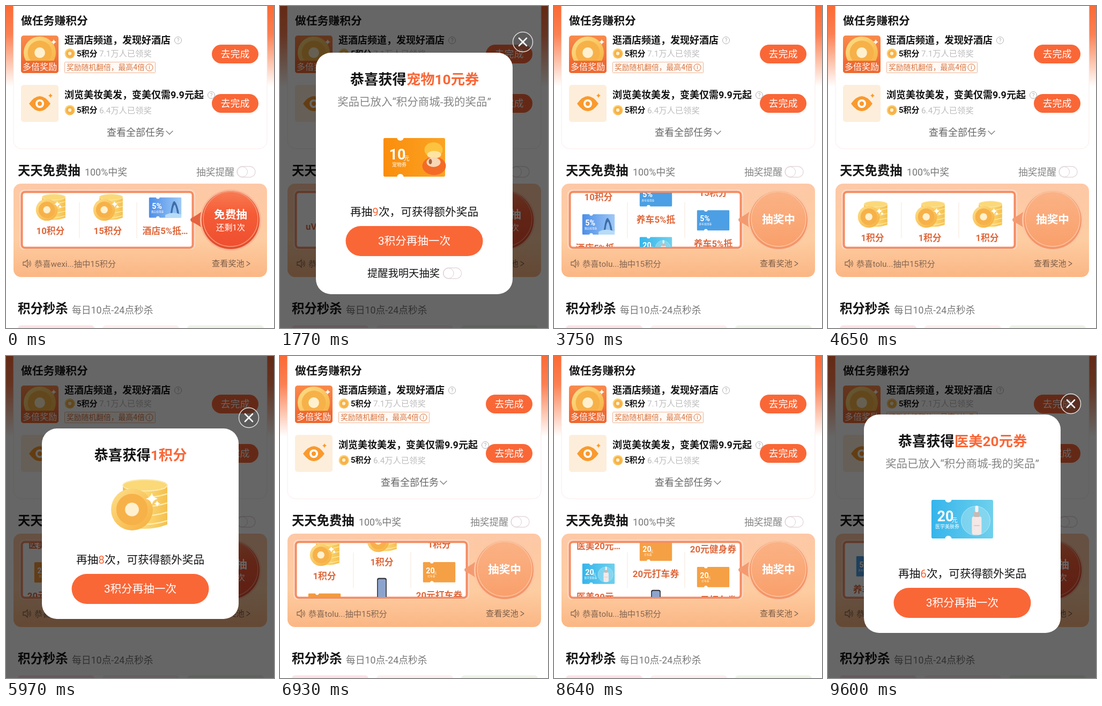
An HTML page that plays this animation: 500 px wide and 600 px high, repeating every 9630 ms.

```html
<!DOCTYPE html>
<html lang="zh-CN">
<head>
<meta charset="utf-8">
<title>天天免费抽</title>
<style>
html, body { margin: 0; width: 100%; height: 100%; overflow: hidden; background: #fff; }
svg { display: block; width: 500px; height: 600px; }
text { font-family: Roboto, "Noto Sans CJK SC", "Noto Sans CJK", sans-serif; white-space: pre; }
</style>
</head>
<body>
<svg id="stage" viewBox="0 0 500 600" xmlns="http://www.w3.org/2000/svg"></svg>
<script>
const LOOP = 9630, PITCH = 95, ORANGE = '#fa6737', INK = '#141414';
const COLUMNS = [83, 190, 297];

// --- drawing helpers ---
const text = (x, cy, size, str, fill = INK, weight = 400, anchor = 'start') =>
  `<text x="${x}" y="${cy + size * .36}" font-size="${size}" fill="${fill}" font-weight="${weight}" text-anchor="${anchor}">${str}</text>`;
const mid = (x, cy, size, str, fill, weight) => text(x, cy, size, str, fill, weight, 'middle');
const rect = (x, y, w, h, r, fill, extra = '') =>
  `<rect x="${x}" y="${y}" width="${w}" height="${h}" rx="${r}" fill="${fill}" ${extra}/>`;
const circle = (x, y, r, fill, extra = '') => `<circle cx="${x}" cy="${y}" r="${r}" fill="${fill}" ${extra}/>`;
const path = (d, fill, extra = '') => `<path d="${d}" fill="${fill}" ${extra}/>`;
const line = (d, color, w) => path(d, 'none', `stroke="${color}" stroke-width="${w}" stroke-linecap="round" stroke-linejoin="round"`);
const group = (x, y, scale, body) => `<g transform="translate(${x} ${y}) scale(${scale})">${body}</g>`;
const linear = (id, x2, y2, ...stops) => `<linearGradient id="${id}" x2="${x2}" y2="${y2}">` +
  stops.map(([o, c]) => `<stop offset="${o}" stop-color="${c}"/>`).join('') + '</linearGradient>';
const sparkle = (x, y, r, fill = '#fff') =>
  path(`M${x} ${y - r}Q${x + r * .2} ${y - r * .2} ${x + r} ${y}Q${x + r * .2} ${y + r * .2} ${x} ${y + r}Q${x - r * .2} ${y + r * .2} ${x - r} ${y}Q${x - r * .2} ${y - r * .2} ${x} ${y - r}Z`, fill);
const toggle = (x, y) => rect(x, y, 34, 20, 10, '#fff', 'stroke="#e6d9dc" stroke-width="1.3"') +
  circle(x + 10, y + 10, 9.5, '#fff', 'stroke="#dcd0d4"');
const hint = (x, y, mark, color) => circle(x, y, 6.5, 'none', `stroke="${color}"`) + mid(x, y, 10, mark, color);

const coin = (x, y, r) => circle(x, y, r, 'url(#gold)') + circle(x, y, r * .75, '#f7b149') + circle(x, y, r * .33, '#fff1cf');

// Art is centred on the origin.
const coinStack = () => group(-52, -48, 1,
  path('M22 11V84Q63 100 105 84V11Z', 'url(#stack)') +
  [27, 44, 61, 77].map(y => line(`M24 ${y}Q63 ${y + 13} 104 ${y}`, '#fff0b5', 2)).join('') +
  '<ellipse cx="63.5" cy="11" rx="41.5" ry="10.5" fill="#fbd978" stroke="#fce9ae" stroke-width="2"/>' +
  coin(39, 56, 39) + sparkle(76, 36, 11) + sparkle(86, 45, 6));

const ticketShape = 'M-55 -36H-32A6 5 0 0 0 -20 -36H55Q57.5 -36 57.5 -33V33Q57.5 36 55 36H-20A6 5 0 0 0 -32 36H-55Q-57.5 36 -57.5 33V-33Q-57.5 -36 -55 -36Z';
const ticket = (fill, amount, unit, name, art) => path(ticketShape, fill) +
  text(-47, -6, 27, amount, '#fff', 700) + text(-20, 2, 11, unit, '#fff') +
  mid(-28, 14, 9, name, '#fff', 500) + art;
const petArt = '<ellipse cx="37" cy="16" rx="22" ry="17" fill="#f46b26"/>' +
  '<ellipse cx="36" cy="-14" rx="17" ry="14" fill="#fbc33f"/><ellipse cx="37" cy="-5" rx="13" ry="7" fill="#ffe3a1"/>' +
  '<ellipse cx="36" cy="9" rx="13" ry="9" fill="#f7d7b6"/><ellipse cx="30" cy="8" rx="3" ry="5" fill="#a4653f"/>';
const bottleArt = circle(25, 3, 27, '#94dcf2', 'opacity=".65" stroke="#d8f6ff"') +
  rect(18, -5, 18, 34, 4, '#f5e8e6') + rect(22, -14, 10, 10, 1, '#c9b9b5') + rect(24, -25, 6, 12, 2, '#f3f3f3') +
  line('M22 12H32', '#c9a9a0', 1);
const roadArt = path('M18 26Q25 -28 34 -22Q45 -10 50 26H43Q38 -8 33 -10Q26 0 25 26Z', '#3d6ea8') + path('M0 26Q28 12 57 25V36H0Z', '#b7dcf8');

const art = {
  coins: coinStack(),
  pet: ticket('url(#petBg)', '10', '元', '宠物券', petArt),
  skin: ticket('url(#skinBg)', '20', '元', '医学美肤券', bottleArt),
  ride: ticket('#f5a044', '20', '元', '打车券', ''),
  gym: ticket('#f39a3c', '20', '元', '健身券', ''),
  car: ticket('#4c9fe4', '5%', '', '养车抵用券', ''),
  hotel: ticket('url(#hotelBg)', '5%', '', '酒店抵用券', roadArt),
  phone: rect(-17, -42, 34, 84, 7, '#30323a') + rect(-14, -38, 28, 76, 5, '#8ca4cd')
};

const item = (kind, label) => ({ kind, label });
const strip = [
  item('coins', '10积分'), item('phone', 'uVelmo…'), item('ride', '20元打车券'), item('gym', '20元健身券'),
  item('skin', '医美20元…'), item('car', '养车5%抵'), item('coins', '15积分'), item('hotel', '酒店5%抵…')
];
const stripShift = [0, 6, 7];

const draws = [
  { start: 300, stop: 1200, show: 1530, hide: 3240, left: 9, kind: 'pet', won: '宠物10元券', label: '宠物10元…', top: 87, height: 450, remind: true },
  { start: 3270, stop: 4350, show: 5010, hide: 6240, left: 8, kind: 'coins', won: '1积分', label: '1积分', top: 135, height: 355 },
  { start: 6270, stop: 7140, show: 7500, hide: 8040, left: 7, kind: 'coins', won: '1积分', label: '1积分', top: 135, height: 355 },
  { start: 8070, stop: 8970, show: 9300, hide: 9900, left: 6, kind: 'skin', won: '医美20元券', label: '医美20元…', top: 109, height: 407 }
];

// --- static page ---
const taskTitle = (y, title, hintX) => text(109, y, 18, title, INK, 700) + hint(hintX, y, '?', '#b0b0b0');
const reward = (y, count) => coin(119, y, 9.5) + text(132, y, 15, '5积分', INK, 700) + text(174, y, 15.3, count, '#bcbcbc');
const goButton = y => rect(384, y, 87, 35, 17.5, ORANGE) + mid(427.5, y + 17.5, 18, '去完成', '#fff');

const defs = `<defs>
  ${linear('sky', 0, 1, [0, '#fb6a35'], [.35, '#fb8052'], [.7, '#fdc4ad'], [1, '#fff'])}
  ${linear('gold', 1, 1, [0, '#fde08a'], [1, '#f6ae3c'])}
  ${linear('stack', 1, 0, [0, '#f6bd4e'], [.5, '#fbd877'], [1, '#f5c04f'])}
  ${linear('badge', 0, 1, [0, '#f98a4c'], [1, '#f2602c'])}
  ${linear('panel', 0, 1, [0, '#fdc8a6'], [.6, '#fdcda2'], [1, '#fbb684'])}
  ${linear('red', 0, 1, [0, '#f87a52'], [.4, '#f55c36'], [1, '#ef4f30'])}
  ${linear('pale', 0, 1, [0, '#fbb285'], [1, '#f9a06c'])}
  ${linear('petBg', 1, 0, [0, '#fb8d0c'], [1, '#fba324'])}
  ${linear('skinBg', 1, 0, [0, '#35b5ec'], [1, '#6fd0ec'])}
  ${linear('hotelBg', 1, 0, [0, '#4d8ee8'], [1, '#9fc9f6'])}
  <clipPath id="window"><rect x="32" y="348" width="314" height="101" rx="4"/></clipPath>
  <clipPath id="tickerBox"><rect x="50" y="468" width="220" height="24"/></clipPath>
  <clipPath id="badgeBox"><rect x="28" y="55" width="70" height="70" rx="5"/></clipPath>
</defs>`;

const tasks = rect(0, 0, 500, 150, 0, 'url(#sky)') +
  rect(14, -20, 473, 286, 15, '#fff', 'stroke="#fcebea"') +
  text(28, 27.5, 20.8, '做任务赚积分', INK, 700) +
  `<g clip-path="url(#badgeBox)">${rect(28, 55, 70, 70, 0, 'url(#badge)')}${coin(63, 87, 30)}${rect(28, 102, 70, 23, 0, '#ef6a32')}</g>` +
  sparkle(89, 67, 5) + mid(63, 113, 16, '多倍奖励', '#fff', 500) +
  taskTitle(64, '逛酒店频道，发现好酒店', 321) + reward(88.5, '7.1万人已领奖') +
  rect(109.5, 104.5, 169, 20, 1, '#fffaf6', 'stroke="#eeb596"') +
  text(113, 114.5, 13.8, '奖励随机翻倍，最高4倍', '#d9753f') + hint(267.5, 114.5, 'i', '#d9753f') +
  goButton(72) +
  rect(28, 147, 70, 69, 5, '#fdeedb') + path('M43 182Q63 154 83 182Q63 210 43 182Z', '#f99a2e') +
  circle(63, 182, 8, '#fff') + circle(63, 182, 4.2, '#f99a2e') + sparkle(83, 167, 4.5, '#f99a2e') +
  taskTitle(166, '浏览美妆美发，变美仅需9.9元起', 383) + reward(194, '6.4万人已领奖') + goButton(164) +
  text(188, 236, 18, '查看全部任务', '#666') + line('M299 233L305 239L311 233', '#777', 1.3);

const lottery = text(22, 307, 23.3, '天天免费抽', INK, 700) + text(147, 310, 17.9, '100%中奖', '#777') +
  text(355, 310, 17.8, '抽奖提醒', '#858585') + toggle(431, 299) +
  rect(14, 331, 473, 174, 14, 'url(#panel)') +
  rect(25, 342, 328, 112, 9, '#fcd9c4') +
  rect(29.5, 346.5, 319, 104, 6, '#fff', 'stroke="#f58c62" stroke-width="4"') +
  [137, 244].map(x => line(`M${x} 366V432`, '#f8e5d9', 1)).join('') +
  '<g id="reels" clip-path="url(#window)"></g><g id="knob"></g>' +
  path('M32 477H36L40 473V487L36 483H32Z', 'none', 'stroke="#886650" stroke-width="1.3"') +
  line('M42.5 477Q44.5 480 42.5 483M44.5 474.5Q48 480 44.5 485.5', '#886650', 1.2) +
  '<g clip-path="url(#tickerBox)"><g id="ticker">' +
  ['wexi', 'tolu'].map((n, i) => text(53, 480 + i * 24, 15.3, `恭喜${n}...抽中15积分`, '#846552')).join('') + '</g></g>' +
  text(384, 480, 15.2, '查看奖池', '#7c5d49') + line('M449 476L455 480L449 484', '#7c5d49', 1.2);

const sale = text(22, 564, 23.4, '积分秒杀', INK, 700) + text(123, 567, 17.8, '每日10点-24点秒杀', '#777') +
  rect(22, 595, 143, 30, 6, '#fde2e6') + rect(180, 595, 143, 30, 6, '#fdeeee') + rect(338, 595, 143, 30, 6, '#edf4e7');

// --- changing parts ---
const knob = busy => path('M346 395Q358 389 370 379V417Q358 407 346 402Q342 398 346 395Z', busy ? '#f49a70' : '#e5633f') +
  circle(419, 399, 57, busy ? '#fbc7a4' : '#fab595') +
  circle(419, 399, 54, busy ? '#f59668' : '#e2512f') +
  circle(419, 397, 51, busy ? 'url(#pale)' : 'url(#red)', `stroke="${busy ? '#fcc6a4' : '#fa9a7a'}" stroke-width="1.5"`) +
  (busy ? mid(419, 397.5, 20.7, '抽奖中', '#fff', 700)
        : mid(419, 389, 20.7, '免费抽', '#fff', 700) + mid(419, 413, 15.2, '还剩1次', '#fff'));

function popup(d) {
  const { top, height } = d, plain = d.kind === 'coins';
  const shift = top + (plain ? -52 : 0);
  const closeY = top - 20;
  return rect(67, top, 367, height, 28, '#fff') +
    circle(453, closeY, 18.5, 'rgba(60,60,60,.25)', 'stroke="#ddd" stroke-width="1.5"') +
    line(`M446 ${closeY - 7}L460 ${closeY + 7}M460 ${closeY - 7}L446 ${closeY + 7}`, '#fff', 2.6) +
    mid(251, top + 50, 26.3, `恭喜获得<tspan fill="${ORANGE}">${d.won}</tspan>`, INK, 700) +
    (plain ? '' : mid(250.5, top + 92, 20.5, '奖品已放入“积分商城-我的奖品”', '#858585')) +
    group(plain ? 248 : 250.5, top + (plain ? 143 : 195), 1, art[d.kind]) +
    mid(250.5, shift + 297, 20.7, `再抽<tspan fill="${ORANGE}">${d.left}</tspan>次，可获得额外奖品`) +
    rect(122.5, shift + 323, 256, 56, 28, ORANGE) + mid(250.5, shift + 351, 20.6, '3积分再抽一次', '#fff') +
    (d.remind ? text(163, top + 411, 19.3, '提醒我明天抽奖') + toggle(304.5, top + 401) : '');
}

const stage = document.getElementById('stage');
stage.innerHTML = defs + rect(0, 0, 500, 600, 0, '#fff') + tasks + lottery + sale +
  rect(0, 0, 500, 600, 0, '#000', 'id="shade"') +
  draws.map((d, i) => `<g id="popup${i}">${popup(d)}</g>`).join('');
const el = id => document.getElementById(id);
const reels = el('reels'), knobBox = el('knob'), ticker = el('ticker'), shade = el('shade');
const popups = draws.map((d, i) => el('popup' + i));

const clamp = v => Math.max(0, Math.min(1, v));
const easeOut = u => 1 - (1 - u) ** 3;
const idle = t => .0492 * t + (t > 4000 ? 19 : 0);

function reel(col, t, draw) {
  let offset = idle(t), winner = -1;
  if (draw) {
    const from = idle(draw.start);
    winner = Math.ceil(from / PITCH) + 16;
    const u = clamp((t - draw.start) / (draw.stop + col * 90 - draw.start));
    offset = from + (winner * PITCH + 13 - from) * easeOut(u);
  }
  const first = Math.floor(offset / PITCH);
  let out = '';
  for (let k = Math.max(0, first - 1); k <= first + 2; k++) {
    const it = k === winner ? draw : strip[(k + stripShift[col]) % strip.length];
    const y = 419 + offset - k * PITCH;
    out += group(COLUMNS[col], y - 43.5, .525, art[it.kind]) + mid(COLUMNS[col], y, 16.8, it.label, '#df683c', 700);
  }
  return out;
}

let wasBusy;
function render(t) {
  const spinning = draws.find(d => t >= d.start && t < d.show);
  reels.innerHTML = COLUMNS.map((x, i) => reel(i, t, spinning)).join('');
  if (wasBusy !== !!spinning) knobBox.innerHTML = knob(wasBusy = !!spinning);
  ticker.setAttribute('transform', `translate(0 ${-24 * clamp((t - 2400) / 300)})`);
  let dim = 0;
  draws.forEach((d, i) => {
    const alpha = Math.min(clamp((t - d.show) / 150), clamp((d.hide - t) / 120));
    popups[i].setAttribute('opacity', alpha);
    popups[i].style.display = alpha ? '' : 'none';
    dim = Math.max(dim, alpha);
  });
  shade.setAttribute('opacity', dim * .6);
}

const began = performance.now();
function tick() {
  render((performance.now() - began) % LOOP);
  requestAnimationFrame(tick);
}
tick();
</script>
</body>
</html>
```
